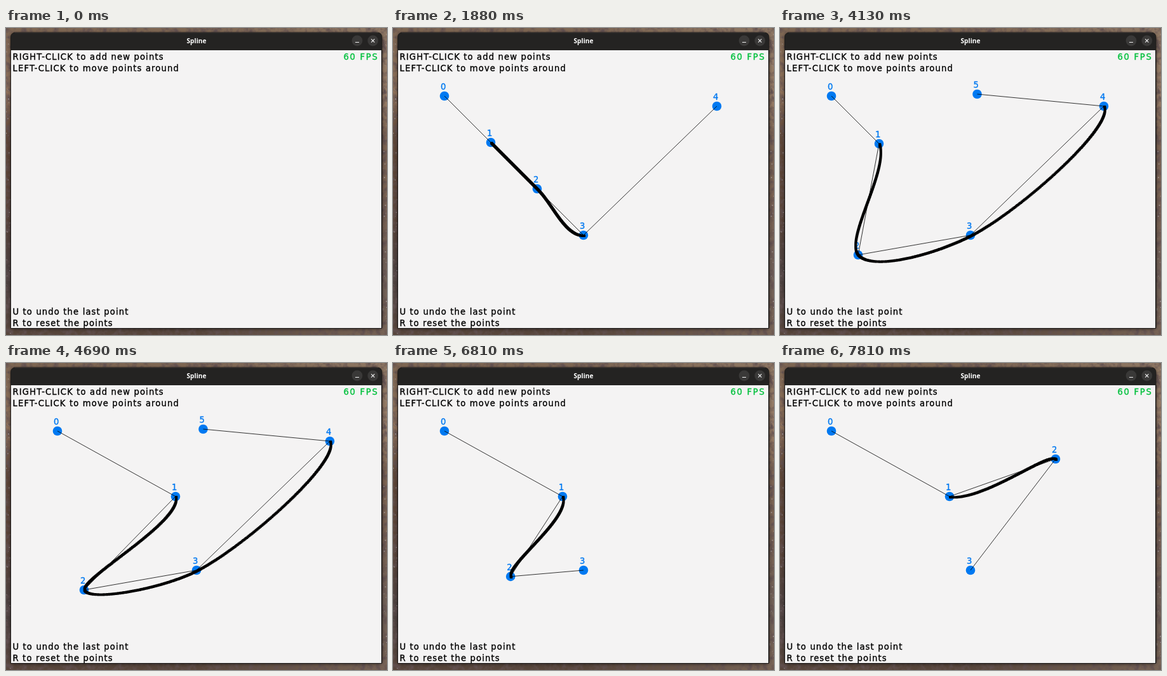
Animation of 600 by 483 pixels, one loop 8000 ms. Source, as an HTML page:

```html
<!DOCTYPE html>
<html lang="en">
<head>
<meta charset="utf-8">
<title>Spline</title>
<style>
  html, body { margin: 0; width: 100%; height: 100%; overflow: hidden; background: #4d3d34; }
  svg { display: block; width: 600px; height: 483px; }
  text { font: 13.2px "DejaVu Sans", sans-serif; letter-spacing: 1.12px; white-space: pre; stroke: #000; stroke-width: .35; }
  .title { font: bold 10.2px "Open Sans", "Noto Sans", sans-serif; letter-spacing: 0; fill: #fff; stroke: none; }
  .fps { fill: #00c03c; stroke: #00c03c; letter-spacing: 1.7px; }
  #labels, #dots { fill: #0079f1; }
  #labels text { stroke: #0079f1; }
</style>
</head>
<body>
<svg viewBox="0 0 600 483">
  <defs>
    <linearGradient id="sky" x2="0" y2="1">
      <stop offset="0" stop-color="#7d6652"/>
      <stop offset=".22" stop-color="#8d7059"/>
      <stop offset=".35" stop-color="#5d4536"/>
      <stop offset=".6" stop-color="#584236"/>
      <stop offset=".8" stop-color="#4b4140"/>
      <stop offset="1" stop-color="#57453a"/>
    </linearGradient>
    <linearGradient id="glow">
      <stop offset=".5" stop-color="#a8917c" stop-opacity="0"/>
      <stop offset="1" stop-color="#a8917c" stop-opacity=".4"/>
    </linearGradient>
    <filter id="soft" x="-10%" y="-10%" width="120%" height="120%"><feGaussianBlur stdDeviation="2"/></filter>
    <filter id="mottle" x="0" y="0" width="100%" height="100%">
      <feTurbulence type="fractalNoise" baseFrequency=".12" numOctaves="3" seed="4"/>
      <feColorMatrix values="0 0 0 0 .12  0 0 0 0 .08  0 0 0 0 .08  2.4 0 0 0 -.95"/>
    </filter>
  </defs>
  <rect width="600" height="483" fill="url(#sky)"/>
  <rect width="600" height="483" fill="url(#glow)"/>
  <rect width="600" height="483" filter="url(#mottle)"/>
  <g id="stars" fill="#b9b3b8"></g>
  <rect x="7" y="8" width="586" height="466" rx="8" filter="url(#soft)" opacity=".5"/>
  <path d="M7.5 472.5V15q0-8 8-8H584q8 0 8 8V472.5Z" fill="#242322" stroke="#1a1817" stroke-width=".8"/>
  <path d="M14 7.6H586" stroke="#3a3836" stroke-width=".8"/>
  <rect x="8" y="35" width="583" height="437" fill="#f4f3f3"/>
  <text class="title" x="300" y="24" text-anchor="middle">Spline</text>
  <g fill="#3a3938"><circle cx="553" cy="20" r="8.4"/><circle cx="577.8" cy="20" r="8.4"/></g>
  <path d="M550 22.5h6M575.2 17.4l5.2 5.2m0-5.2l-5.2 5.2" stroke="#f2f2f2" stroke-width="1.2" fill="none"/>

  <g id="dots"></g>
  <g id="labels"></g>
  <polyline id="chain" fill="none" stroke="#000" stroke-width=".8"/>
  <path id="curve"/>

  <text x="10.5" y="49.8">RIGHT-CLICK to add new points</text>
  <text x="10.5" y="67.8">LEFT-CLICK to move points around</text>
  <text x="10.5" y="451.3">U to undo the last point</text>
  <text x="10.5" y="469.3">R to reset the points</text>
  <text x="531.5" y="49.8" class="fps">60 FPS</text>
</svg>
<script>
const LOOP = 8000, STEP = 62.5, BRUSH = 4, BRUSH_SHIFT = -.9, SAMPLES = 160;
const $ = id => document.getElementById(id);

// Each handle: lifetime and [time, x, y] stops.
const handles = [
  { from: 60, to: LOOP, stops: [[0, 81, 107]] },
  { from: 60, to: LOOP, stops: [[4062, 154, 180], [4125, 156, 182], [4250, 180, 188],
      [4437, 232, 202], [4625, 267, 210]] },
  { from: 60, to: LOOP, stops: [[2937, 227, 253], [3125, 202, 283], [3312, 169, 320],
      [3500, 142, 344], [3750, 123, 357], [6562, 123, 357], [6687, 142, 353], [6812, 185, 336],
      [7062, 278, 283], [7312, 367, 209], [7500, 417, 162], [7687, 434, 151]] },
  { from: 60, to: LOOP, stops: [[0, 300, 326]] },
  { from: 1800, to: 5800, stops: [[0, 510, 123]] },
  { from: 2555, to: 5180, stops: [[0, 310.5, 104]] },
];

function add(parent, tag, attrs) {
  const node = document.createElementNS("http://www.w3.org/2000/svg", tag);
  for (const key in attrs) node.setAttribute(key, attrs[key]);
  return parent.appendChild(node);
}

let seed = 7;
const random = () => (seed = seed * 16807 % 2147483647) / 2147483647;
for (let i = 0; i < 90; i++) {
  const left = random() < .5;
  add($("stars"), "circle", {
    cx: (left ? 0 : 593) + random() * 7, cy: random() * 483,
    r: .3 + random() * .7, opacity: .2 + random() * .5,
  });
}

handles.forEach((handle, i) => {
  handle.dot = add($("dots"), "circle", { r: 7.3 });
  handle.label = add($("labels"), "text", {});
  handle.label.textContent = i;
});

function place(stops, t) {
  const next = stops.findIndex(stop => stop[0] > t);
  if (next === 0) return stops[0].slice(1);
  if (next < 0) return stops[stops.length - 1].slice(1);
  const a = stops[next - 1], b = stops[next], k = (t - a[0]) / (b[0] - a[0]);
  return [1, 2].map(j => a[j] + (b[j] - a[j]) * k);
}

// Centripetal Catmull-Rom segment from b to c, stamped with a square brush.
function segment(a, b, c, d) {
  const knot = (p, q) => Math.sqrt(Math.hypot(q[0] - p[0], q[1] - p[1])) || 1e-3;
  const u = knot(a, b), v = knot(b, c), w = knot(c, d);
  const m = [0, 1].map(j => c[j] - b[j] + v * ((b[j] - a[j]) / u - (c[j] - a[j]) / (u + v)));
  const n = [0, 1].map(j => c[j] - b[j] + v * ((d[j] - c[j]) / w - (d[j] - b[j]) / (v + w)));
  let path = "";
  for (let i = 0; i <= SAMPLES; i++) {
    const t = i / SAMPLES, s = 1 - t;
    const [x, y] = [0, 1].map(j => BRUSH_SHIFT +
      b[j] * (1 + 2 * t) * s * s + m[j] * t * s * s + c[j] * t * t * (3 - 2 * t) - n[j] * t * t * s);
    path += `M${x.toFixed(2)} ${y.toFixed(2)}h${BRUSH}v${BRUSH}h-${BRUSH}z`;
  }
  return path;
}

function draw(time) {
  const t = Math.floor((time % LOOP + 3) / STEP) * STEP;
  const points = [];
  for (const { from, to, stops, dot, label } of handles) {
    const shown = t >= from && t < to;
    dot.style.display = label.style.display = shown ? "" : "none";
    if (!shown) continue;
    const [x, y] = place(stops, t);
    points.push([x, y]);
    dot.setAttribute("cx", x);
    dot.setAttribute("cy", y);
    label.setAttribute("x", x - 6);
    label.setAttribute("y", y - 10);
  }
  $("chain").setAttribute("points", points.join(" "));
  let path = "";
  for (let i = 0; i + 3 < points.length; i++) path += segment(...points.slice(i, i + 4));
  $("curve").setAttribute("d", path);
}

const start = performance.now();
function tick() {
  draw(performance.now() - start);
  requestAnimationFrame(tick);
}
tick();
</script>
</body>
</html>
```
